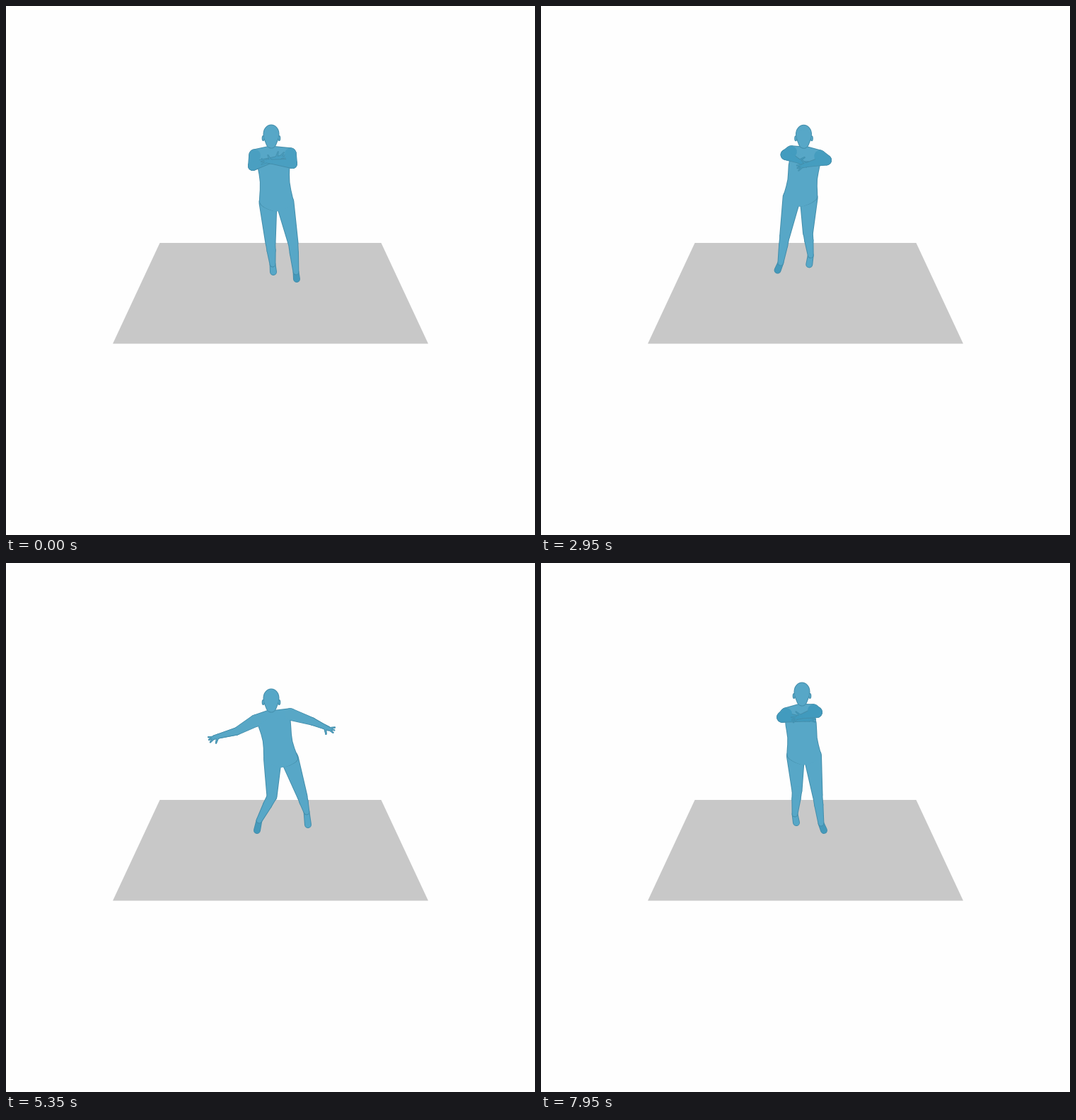
Write an HTML page with a canvas that moves like this. It is 748 by 748 pixels and loops after 8000 ms.

```html
<!DOCTYPE html>
<html lang="en">
<head>
<meta charset="utf-8">
<title>Dancing figure</title>
<style>
html, body { margin: 0; width: 100%; height: 100%; overflow: hidden; background: #fefefe; }
canvas { display: block; }
</style>
</head>
<body>
<canvas id="stage" width="748" height="748"></canvas>
<script>
const ctx = document.getElementById('stage').getContext('2d');
const LOOP = 8000, STEP = 50, MIRROR_SUM = 741;
const BASE = 'hsl(197 50% 56%)', EDGE = 'hsl(197 43% 47%)', FOOT = 'hsl(197 46% 50%)';

// Joint order: head, pelvis, then left/right pairs of shoulder, elbow, wrist, knee, ankle, toe.
const crossedWide = [375,183, 382.5,278, 352,211, 402,209, 349,226, 405,223, 382,216, 375,220,
  374,335, 406,335, 377,365, 410,376, 378,376, 411,386];
const tuck = [379,197, 377,284, 355,224, 401,223, 335,254, 412,253, 367,257, 396,247,
  389,332, 398,335, 368,331, 393,366, 377,349, 402,384];
const spread = [362,202, 351,293, 338,230, 380,227, 296,237, 424,224, 263,245, 459,225,
  322,338, 372,342, 296,375, 372,372, 296,391, 375,386];
const crossedLeft = [368,189, 372,273, 346,214, 394,213, 342,224, 398,224, 362,228, 374,228,
  362,332, 382,328, 364,371, 377,358, 366,384, 378,369];
const openArms = [375,193, 389,277, 353,223, 402,214, 326,238, 433,224, 300,245, 451,232,
  376,330, 419,330, 358,364, 425,352, 355,378, 427,370];
const dropArms = [374,197, 387,280, 351,223, 402,216, 321,231, 427,228, 313,257, 431,250,
  367,332, 421,327, 359,362, 432,350, 358,379, 435,364];
const crossedRight = [369,184, 372,273, 347,213, 385,208, 341,218, 390,211, 374,221, 368,217,
  362,322, 391,328, 359,355, 396,368, 361,367, 400,378];

const shift = (pose, dx, dy) => pose.map((v, i) => v + (i % 2 ? dy : dx));

function mirror(pose) {
  const out = [];
  for (let j = 0; j < pose.length / 2; j++) {
    const from = j < 2 ? j : j ^ 1;
    out.push(MIRROR_SUM - pose[from * 2], pose[from * 2 + 1]);
  }
  return out;
}

const keys = [
  [0, crossedWide],
  [450, shift(crossedLeft, 10, -4)],
  [900, tuck],
  [1400, mirror(openArms)],
  [1800, shift(spread, -3, 1)],
  [2050, spread],
  [2550, mirror(dropArms)],
  [3050, shift(mirror(crossedRight), 0, -3)],
  [3550, shift(crossedRight, 0, -2)],
  [4000, crossedLeft],
  [4450, shift(crossedWide, -4, 3)],
  [4900, mirror(tuck)],
  [5350, openArms],
  [5900, shift(mirror(spread), 5, -5)],
  [6400, dropArms],
  [6950, shift(crossedRight, 4, -4)],
  [7450, shift(crossedLeft, 2, -10)],
  [7950, crossedRight]
];

// Cubic Hermite interpolation through the key poses.
function poseAt(t) {
  const last = keys.length - 1;
  let k = 0;
  while (k < last - 1 && keys[k + 1][0] <= t) k++;
  const [t0, a] = keys[k], [t1, b] = keys[k + 1];
  const [tp, p] = keys[Math.max(0, k - 1)], [tn, n] = keys[Math.min(last, k + 2)];
  const span = t1 - t0, u = (t - t0) / span, w = 1 - u;
  return a.map((v, i) => {
    const m0 = (b[i] - p[i]) / (t1 - tp) * span;
    const m1 = (n[i] - v) / (tn - t0) * span;
    return v * (1 + 2 * u) * w * w + m0 * u * w * w + b[i] * u * u * (3 - 2 * u) - m1 * u * u * w;
  });
}

const mix = (a, b, k) => ({ x: a.x + (b.x - a.x) * k, y: a.y + (b.y - a.y) * k });
const gap = (a, b) => Math.hypot(b.x - a.x, b.y - a.y);
const polar = (p, angle, length) => ({ x: p.x + Math.cos(angle) * length, y: p.y + Math.sin(angle) * length });

// Shapes are functions of an inset, so each can be painted as rim and then as body.
const taper = (a, ra, b, rb) => inset => {
  const d = Math.atan2(b.y - a.y, b.x - a.x);
  const tilt = Math.acos(Math.max(-1, Math.min(1, (ra - rb) / (gap(a, b) || 1))));
  ctx.beginPath();
  ctx.arc(a.x, a.y, Math.max(.3, ra - inset), d + tilt, d - tilt + 2 * Math.PI);
  ctx.arc(b.x, b.y, Math.max(.3, rb - inset), d - tilt, d + tilt);
  ctx.fill();
};

const oval = (x, y, rx, ry) => inset => {
  ctx.beginPath();
  ctx.ellipse(x, y, rx - inset, ry - inset, 0, 0, 2 * Math.PI);
  ctx.fill();
};

function paint(shapes, color, inset = 0) {
  ctx.fillStyle = color;
  shapes.forEach(shape => shape(inset));
}

function layer(shapes, color = BASE) {
  paint(shapes, EDGE);
  paint(shapes, color, 1);
}

function legOf(hip, knee, ankle, toe) {
  const calf = mix(knee, ankle, .35);
  return {
    toe,
    skin: [taper(hip, 13, knee, 7.5), taper(knee, 7.2, calf, 6.6), taper(calf, 6.6, ankle, 4.4)],
    foot: [taper(ankle, 4.4, toe, 5)]
  };
}

function armOf(shoulder, elbow, wrist, side) {
  const bent = Math.max(0, 1 - gap(shoulder, elbow) / 28);
  const angle = Math.atan2(wrist.y - elbow.y, wrist.x - elbow.x);
  const r = 5.6 + 3 * bent;
  const palm = polar(wrist, angle, 5);
  const fingers = [-.38, -.1, .18].map(s => taper(palm, 1.9, polar(wrist, angle + s, 14), 1));
  return {
    color: `hsl(197 49% ${56 - 8 * bent}%)`,
    upper: [taper(shoulder, 8.8, elbow, r)],
    fore: [taper(elbow, r, wrist, 3.5), taper(wrist, 3.5, palm, 3.3), ...fingers,
      taper(wrist, 2, polar(wrist, angle + side, 10), 1.1)]
  };
}

function torsoOf(head, shoulderL, shoulderR, pelvis) {
  const top = mix(shoulderL, shoulderR, .5);
  const row = (k, half) => {
    const c = mix(top, pelvis, k);
    return [{ x: c.x - half, y: c.y }, { x: c.x + half, y: c.y }];
  };
  const rows = [row(.25, 23), row(.58, 20.5), row(.9, 24), row(1.06, 25)];
  const outline = [{ x: head.x - 7, y: head.y + 16 }, shoulderL, ...rows.map(r => r[0]),
    { x: pelvis.x, y: pelvis.y + 15 }, ...rows.map(r => r[1]).reverse(), shoulderR,
    { x: head.x + 7, y: head.y + 16 }];
  return [inset => {
    ctx.beginPath();
    outline.forEach((p, i) => {
      const next = outline[(i + 1) % outline.length], m = mix(p, next, .5);
      const pull = Math.sign(pelvis.x - m.x) * inset;
      if (i === 0) ctx.moveTo(m.x + pull, m.y);
      else ctx.quadraticCurveTo(p.x + Math.sign(pelvis.x - p.x) * inset, p.y, m.x + pull, m.y);
    });
    ctx.closePath();
    ctx.fill();
  },
  taper({ x: head.x - 4, y: head.y + 21 }, 6, shoulderL, 8.8),
  taper({ x: head.x + 4, y: head.y + 21 }, 6, shoulderR, 8.8)];
}

function drawFloor() {
  ctx.fillStyle = '#c8c8c8';
  ctx.beginPath();
  ctx.moveTo(217.5, 335);
  ctx.lineTo(530.5, 335);
  ctx.lineTo(597, 477.5);
  ctx.lineTo(151, 477.5);
  ctx.fill();
}

function drawFigure(pose) {
  const joints = [];
  for (let i = 0; i < pose.length; i += 2) joints.push({ x: pose[i], y: pose[i + 1] });
  const [head, pelvis, shL, shR, elL, elR, wrL, wrR, knL, knR, anL, anR, toeL, toeR] = joints;
  const hip = side => ({ x: pelvis.x + 12 * side, y: pelvis.y });

  const [back, front] = [legOf(hip(-1), knL, anL, toeL), legOf(hip(1), knR, anR, toeR)]
    .sort((a, b) => a.toe.y - b.toe.y);
  const arms = [armOf(shL, elL, wrL, -1), armOf(shR, elR, wrR, 1)];
  const torso = torsoOf(head, shL, shR, pelvis);

  layer(back.foot);
  layer(back.skin);
  layer(front.foot, FOOT);
  layer([...front.skin, ...torso, ...arms.flatMap(arm => [...arm.upper, ...arm.fore])]);

  layer([oval(head.x - 11.3, head.y + 4, 2, 4), oval(head.x + 11.3, head.y + 4, 2, 4),
    oval(head.x, head.y - 2, 11.5, 13.5), taper({ x: head.x, y: head.y + 2 }, 10.8, { x: head.x, y: head.y + 11 }, 7.5)]);

  for (const arm of arms) {
    paint(arm.fore, EDGE);
    paint([...arm.upper, ...arm.fore], arm.color, .9);
  }
}

function frame() {
  const t = Math.floor(performance.now() % LOOP / STEP) * STEP;
  ctx.fillStyle = '#fefefe';
  ctx.fillRect(0, 0, 748, 748);
  drawFloor();
  drawFigure(poseAt(t));
  requestAnimationFrame(frame);
}
frame();
</script>
</body>
</html>
```
